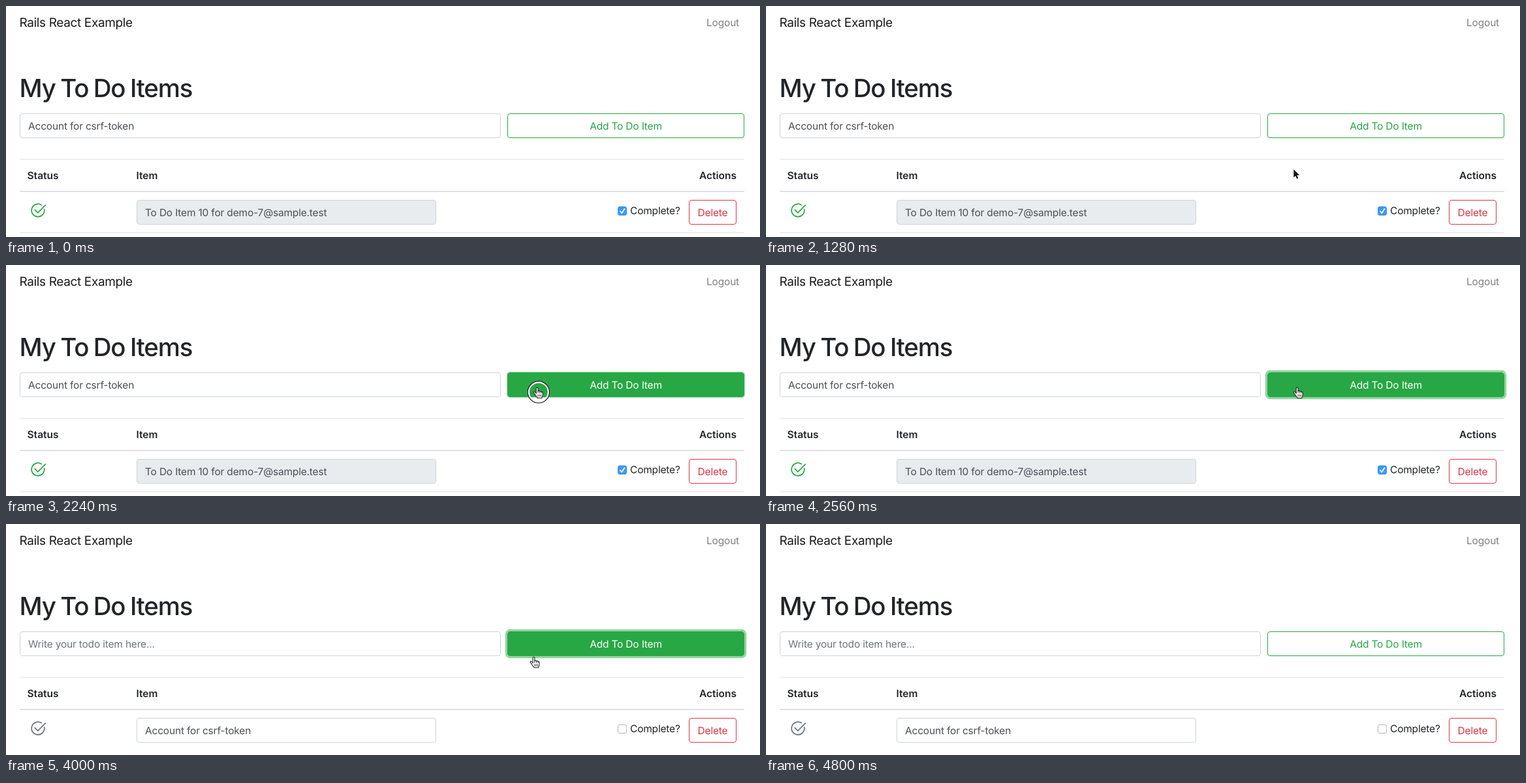
Animation, 1155 px wide and 355 px high, one loop 4960 ms. Source, as an HTML page:

```html
<!DOCTYPE html>
<html lang="en">
<head>
<meta charset="utf-8">
<title>To Do Items</title>
<style>
  html, body { margin: 0; width: 100%; height: 100%; overflow: hidden; background: #fff; }
  svg { display: block; }
  text {
    font: 400 15.5px Inter, sans-serif;
    font-optical-sizing: none;
    letter-spacing: -.19px;
    fill: #212529;
    text-rendering: geometricPrecision;
  }
  .brand { font-size: 19px; letter-spacing: -.36px; fill: #1a1a1a; }
  .title { font-size: 38.5px; font-weight: 500; letter-spacing: -1.2px; word-spacing: -1.5px; }
  .head { font-weight: 600; letter-spacing: 0; }
  .mid { text-anchor: middle; }
  .end { text-anchor: end; }
  .field { fill: #fff; stroke: #ced4da; }
  .rule { fill: #dee2e6; }
  .line { fill: none; stroke-linecap: round; stroke-linejoin: round; }
</style>
</head>
<body>
<svg width="1155" height="355" viewBox="0 0 1155 355">
  <rect width="1155" height="355" fill="#fff"/>
  <text class="brand" x="20.5" y="32">Rails React Example</text>
  <text class="end" x="1123" y="31" style="fill:#7f7f7f">Logout</text>
  <text class="title" x="20.5" y="140">My To Do Items</text>

  <rect class="field" x="21.5" y="165.5" width="736" height="37" rx="3.5"/>
  <text id="entry" x="34" y="190"></text>

  <rect id="ring" fill="none" stroke="#28a745"/>
  <rect id="button" x="768.5" y="165.5" width="362" height="37" rx="3.5" fill="#28a745" stroke="#28a745"/>
  <text id="label" class="mid" x="949.5" y="190">Add To Do Item</text>

  <rect class="rule" x="21" y="235" width="1110" height="1"/>
  <rect class="rule" x="21" y="284" width="1110" height="2"/>
  <rect class="rule" id="rowEnd" x="21" y="348" width="1110" height="1"/>
  <text class="head" x="32.5" y="266">Status</text>
  <text class="head" x="199.5" y="266">Item</text>
  <text class="head end" x="1119" y="266">Actions</text>

  <g id="status" class="line" stroke-width="1.7">
    <path d="M54.2 305.8A9.8 9.8 0 1 0 58.6 312.4"/>
    <path d="M44.2 313.2L48.8 317.8L60.3 306.2"/>
  </g>
  <rect id="itemBox" class="field" x="200.5" y="298.5" width="458" height="37" rx="3.5"/>
  <text id="item" x="213" y="323" style="fill:#495057"></text>

  <rect id="box" x="937.5" y="308.5" width="13" height="13" rx="2.5"/>
  <path id="tick" class="line" d="M940.8 315.4L943.2 318.2L947.5 311.8" stroke="#fff" stroke-width="1.8"/>
  <text x="956" y="320">Complete?</text>
  <rect x="1046.5" y="298.5" width="72" height="37" rx="3.5" fill="#fff" stroke="#dc3545"/>
  <text class="mid" x="1082.5" y="323" style="fill:#dc3545">Delete</text>

  <g id="press" fill="none">
    <circle cx="815.8" cy="195.3" r="15.6" stroke="#fff" stroke-width="3.4"/>
    <circle cx="815.8" cy="195.3" r="16.7" stroke="#111" stroke-width="1.2"/>
  </g>
  <path id="arrow" d="M0 0V12.6L2.9 9.9L4.9 14.4L6.9 13.5L5 9.1H8.8Z" fill="#111" stroke="#fff" stroke-width="1.2" paint-order="stroke"/>
  <g id="hand" class="line" stroke="#222" stroke-width="1.1">
    <path fill="#fff" d="M-1.6 9.2V1.2C-1.6-.6 1.2-.6 1.2 1.2V5.6C1.7 4.7 3.7 4.9 3.9 6.2C4.6 5.4 6.2 5.7 6.4 6.9C7.2 6.3 8.4 6.8 8.4 8V11C8.4 13.4 7.2 14 7 16.2H.2C0 14.4-2.2 13.2-3.5 10.6C-5.4 8-6 7.2-5.1 6.6C-4 6-2.7 7.4-1.6 9.2Z"/>
    <path d="M1.2 5.6V8.4M3.9 6.2V8.6M6.4 6.9V8.8M1.2 11V13.8M3.4 11V13.8M5.6 11V13.8" stroke-width=".9"/>
  </g>
</svg>
<script>
const LOOP = 4960;
const el = id => document.getElementById(id);
const show = (id, on) => el(id).setAttribute('visibility', on ? 'visible' : 'hidden');
const set = (id, attrs) => {
  for (const key in attrs) el(id).setAttribute(key, attrs[key]);
};

// Button states: start time, fill opacity, ring width, ring opacity
const buttonSteps = [
  [0, 0, 0, 0], [1600, .12, 0, 0], [1760, 1, 0, 0], [2240, 1, 1.4, .3],
  [2400, 1, 3.2, .5], [4160, 0, 3.2, .5], [4800, 0, 0, 0]
];
// Pointer states: start time, shape, tip x, tip y
const pointerSteps = [
  [0, ''], [1280, 'arrow', 808.3, 251], [1600, 'hand', 813.2, 190.6],
  [1760, 'hand', 813.8, 188.3], [4000, 'hand', 808.6, 204.6], [4160, '']
];
const stepAt = (steps, t) => steps.filter(s => s[0] <= t).pop();

function drawButton(t) {
  const [, fill, width, alpha] = stepAt(buttonSteps, t);
  set('button', { 'fill-opacity': fill });
  el('label').style.fill = fill > .5 ? '#fff' : '#28a745';
  set('ring', {
    x: 768 - width / 2, y: 165 - width / 2,
    width: 363 + width, height: 38 + width, rx: 4 + width / 2,
    'stroke-width': width, 'stroke-opacity': alpha
  });
}

function drawPointer(t) {
  const [, shape, x, y] = stepAt(pointerSteps, t);
  for (const id of ['arrow', 'hand']) show(id, id === shape);
  if (shape) set(shape, { transform: `translate(${x} ${y})` });
  show('press', t >= 2240 && t < 2560);
}

function drawRow(added) {
  const task = 'Account for csrf-token';
  el('entry').textContent = added ? 'Write your todo item here...' : task;
  el('entry').style.fill = added ? '#6c757d' : '#495057';
  el('item').textContent = added ? task : 'To Do Item 10 for demo-7@sample.test';
  el('itemBox').style.fill = added ? '#fff' : '#e9ecef';
  set('status', { stroke: added ? '#6c757d' : '#28a745' });
  set('box', added ? { fill: '#fff', stroke: '#b4b4b4' } : { fill: '#3b99fc', stroke: '#3a91ee' });
  show('tick', !added);
  show('rowEnd', !added);
}

function render(t) {
  drawButton(t);
  drawPointer(t);
  drawRow(t >= 2880);
}

let start;
function tick(now) {
  start ??= now;
  render((now - start) % LOOP);
  requestAnimationFrame(tick);
}
render(0);
requestAnimationFrame(tick);
</script>
</body>
</html>
```
